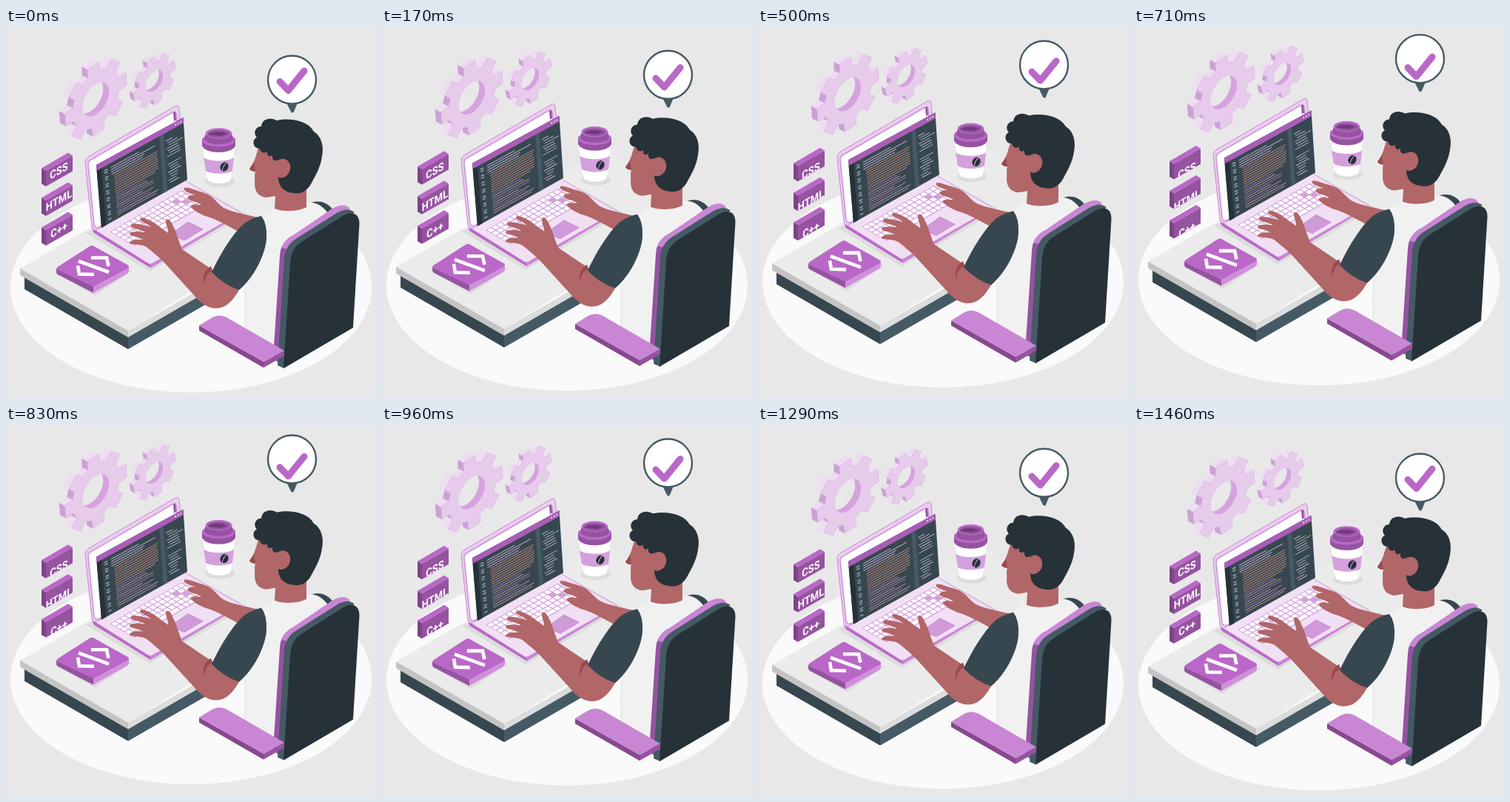
Animation of 500 by 500 pixels, one loop 1500 ms. Source, as an HTML page:

```html
<!DOCTYPE html>
<html lang="en">
<head>
<meta charset="utf-8">
<title>Developer at work</title>
<style>
html, body { margin: 0; width: 100%; height: 100%; overflow: hidden; background: #e8e8e8; }
svg { display: block; width: 100vw; height: 100vh; }
text { font: 700 15px Roboto, Arial, sans-serif; fill: #fff; text-anchor: middle; }
</style>
</head>
<body>
<svg id="stage" viewBox="0 0 500 500"></svg>
<script>
const C = {
  bg: '#e8e8e8', main: '#ba68c8', deep: '#9553a0', soft: '#c986d4', pale: '#e6cbeb',
  ink: '#263238', slate: '#37474f', steel: '#455a64', skin: '#b16668', shade: '#9a4a4e'
};

const path = (d, fill, extra = '') => `<path d="${d}" fill="${fill}" ${extra}/>`;
const poly = (pts, fill, extra = '') => `<polygon points="${pts}" fill="${fill}" ${extra}/>`;
const line = (d, color, w, extra = '') =>
  `<path d="${d}" fill="none" stroke="${color}" stroke-width="${w}" ${extra}/>`;
const oval = (x, y, rx, ry, fill, extra = '') =>
  `<ellipse cx="${x}" cy="${y}" rx="${rx}" ry="${ry}" fill="${fill}" ${extra}/>`;
const fix = p => p.map(n => n.toFixed(1)).join(' ');

let seed = 7;
const rand = () => (seed = seed * 16807 % 2147483647) / 2147483647;

// Upright gear on the left isometric wall, extruded back by (ex, ey).
function gear(id, cx, cy, r, hole, turn, ex, ey) {
  const at = (a, q) => {
    const u = Math.cos(a) * q, v = Math.sin(a) * q;
    return [cx + u * .866, cy - u * .5 + v];
  };
  const rad = d => d * Math.PI / 180;
  const rim = [];
  for (let i = 0; i < 8; i++) {
    const a = turn + i * 45;
    [[-15, .76], [-10.5, 1], [10.5, 1], [15, .76]].forEach(([d, k]) => rim.push(at(rad(a + d), r * k)));
  }
  let out = '';
  rim.forEach((p, i) => {
    const q = rim[(i + 1) % rim.length];
    const nx = q[1] - p[1], ny = p[0] - q[0];
    if (nx * ex + ny * ey <= 0) return;
    const tone = ny < -Math.abs(nx) * .35 ? '#eedcf1' : '#cda1d5';
    out += poly([p, q, [q[0] + ex, q[1] + ey], [p[0] + ex, p[1] + ey]].map(fix).join(' '), tone);
  });
  const ring = [];
  for (let i = 0; i < 48; i++) ring.push(fix(at(i * Math.PI / 24, hole)));
  const inner = 'M' + ring.join('L') + 'Z';
  return out + path('M' + rim.map(fix).join('L') + 'Z', C.pale, 'stroke="#d5a6de" stroke-width=".5"') +
    `<clipPath id="${id}"><path d="${inner}"/></clipPath><g clip-path="url(#${id})">` +
    path(inner, '#d5a2de') + path(inner, C.bg, `transform="translate(${ex} ${ey})"`) + '</g>';
}

function tag(label, y) {
  const face = `54,${y + 24.5} 90,${y + 4} 90,${y + 25} 54,${y + 45.5}`;
  return poly(`48,${y + 21} 54,${y + 24.5} 54,${y + 45.5} 48,${y + 42}`, '#7d4486') +
    poly(`48,${y + 21} 84,${y} 90,${y + 4} 54,${y + 24.5}`, C.main) + poly(face, C.deep) +
    `<clipPath id="tag${y}"><polygon points="${face}"/></clipPath><g clip-path="url(#tag${y})"><g class="lag">` +
    `<text transform="matrix(.866 -.5 0 1 71.5 ${y + 25})" y="4.500">${label}</text></g></g>`;
}

function desk() {
  return poly('25,337 165,417 165,434 25,353', C.slate) +
    poly('165,417 290,345 290,362 165,434', C.steel) +
    poly('19,325 300,163 420,250 165,409', '#ebebeb') +
    poly('19,325 165,409 165,418 19,334', '#c4c4c4') +
    poly('165,409 300,331 300,340 165,418', '#dcdcdc');
}

// Point on the screen, u across and v down.
function onScreen(u, v) {
  const mix = (a, b, c, d) => (a * (1 - u) + b * u) * (1 - v) + (c * (1 - u) + d * u) * v;
  return fix([mix(122, 239.5, 129, 245), mix(185, 121, 270, 205)]);
}
const area = (u0, v0, u1, v1, fill) =>
  poly([[u0, v0], [u1, v0], [u1, v1], [u0, v1]].map(p => onScreen(...p)).join(' '), fill);
const dash = (u0, u1, v, color, w = 1) =>
  line(`M${onScreen(u0, v)}L${onScreen(u1, v)}`, color, w);

function code() {
  let s = area(0, 0, 1, 1, C.slate) + area(0, .09, .055, 1, C.ink) +
    area(.72, .09, .77, 1, C.steel) + area(0, 0, 1, .09, '#a95db6');
  [.91, .94, .97].forEach(u => {
    const [x, y] = onScreen(u, .045).split(' ');
    s += oval(x, y, 1, 1.2, '#f0d9f3');
  });
  for (let i = 0; i < 22; i++) {
    const v = .16 + i * .037;
    const color = i < 4 ? '#cdb9da' : i < 12 ? '#c98d7f' : ['#c98d7f', '#9a76b4', '#b9a3c9'][i % 3];
    const start = .16 + (i > 3 ? .03 : 0);
    const end = i > 3 && i < 12 ? .66 + rand() * .04 : .48 + rand() * .2;
    s += dash(start, end, v, color);
    if (i % 3 !== 2) s += dash(.085, .12, v, '#a9b5ba', 1.3);
  }
  for (let i = 0; i < 17; i++) {
    if (i === 7 || i === 8) continue;
    const u = .79 + (i % 3) * .015;
    s += dash(u, u + .06 + rand() * .11, .22 + i * .042, i % 4 ? '#aeb6bd' : '#d9c1e4');
  }
  return s;
}

function keys() {
  const at = (a, b) => fix([142 + (a + b) * .866, 275.5 + (b - a) * .5]);
  const block = (a, b, w, h, fill) =>
    poly([at(a, b), at(a + w, b), at(a + w, b + h), at(a, b + h)].join(' '), fill);
  let s = block(-1, -1, 112, 38, '#d3a0dc');
  for (let r = 0; r < 5; r++) {
    for (let c = 0; c < 15; c++) {
      const accent = (r === 1 && c === 12) || (r === 2 && c === 13);
      s += block(c * 7.4, r * 7.4, r === 4 && c > 3 && c < 9 ? 7.4 : 6, 6, accent ? '#d4a0dc' : '#fff');
    }
  }
  return s;
}

function laptop() {
  return poly('108,277 194,329 326,252 240,205', '#dcdcdc') +
    path('M117 271L195 319V324L119 277Q117 275 117 271Z', C.main) +
    path('M195 319L315 249Q319 249 317 252L198 323Q196 325 195 324Z', C.soft) +
    path('M117 271L238 204L315 248Q318 249 315 251L198 318Q195 320 192 318Z', '#f1dff4', 'stroke="#c986d4" stroke-width=".8"') +
    keys() + poly('222,279 246,262 266,272 241,287', '#d09ad9', 'stroke="#ba68c8" stroke-width=".6"') +
    path('M107 181Q107 177 111 174L228 106Q233 103 234 108L243 200L122 273Q117 274 116 268Z', '#ebcdf0', 'stroke="#c986d4" stroke-width="1"') +
    path('M111 184Q111 180 115 178L225 114Q229 112 230 116L239 203L126 269Q120 271 119 266Z', '#fff', 'stroke="#d09ad9" stroke-width="1.800"') +
    poly('226,114 229,113 230,124 227,126', C.deep) + code();
}

function pad() {
  return path('M66 331L116 300L170 328L120 362Z', '#dcdcdc') +
    path('M68 325L118 349V358L70 333Q68 332 68 329Z', C.deep) +
    path('M118 349L166 322V328Q166 330 164 332L118 358Z', '#d08fdb') +
    path('M71 322L113 295Q116 293 119 295L164 320Q168 322 164 325L121 348Q118 350 115 348L70 327Q66 325 71 322Z', C.main) +
    line('M97 321L99 332.500L119 333M115 310.500L136 310.500L138.500 322M98 315L139 330', '#fff', 4.6);
}

function cup() {
  return oval(289, 207, 20, 8, '#dcdcdc') +
    path('M266 160L272 204C275 212 301 212 304 204L309 160Z', '#fff') +
    path('M267 175C276 181 299 181 308 175L306 193C298 198 278 198 270 193Z', '#d3a0dc') +
    `<g transform="rotate(30 295 187.5)">${oval(295, 187.5, 5.4, 6.4, C.ink)}${line('M295 181Q292.500 187 295.500 194', '#d3a0dc', 1)}</g>` +
    path('M265 151C265 142 310 142 310 151V159C306 171 269 171 265 159Z', C.deep) +
    oval(287.5, 151.5, 22.3, 9, C.main) +
    path('M270 142H305L307 151C302 159 273 159 268 151Z', C.deep) +
    oval(287.5, 142.5, 17.7, 7.3, C.main) + oval(287.5, 143, 15, 5.4, C.deep) +
    path('M273 144C278 139 292 139 299 143L290 146Z', '#70397a');
}

function man() {
  return path('M345 257C328 253 312 250 301 246C295 244 291 241 288 238L280 230C276 226 270 223 262 221C254 219 248 215 241 216C238 220 248 223 256 226C250 225 243 228 246 231C250 235 258 234 264 239C256 238 248 238 250 242C254 247 262 251 269 254C285 258 300 268 320 278Z', C.skin) +
    path('M412 236C425 232 436 236 443 248L432 256Z', C.slate) +
    path('M343 254L365 242L407 236C418 234 430 241 436 252L385 300L368 442L323 412V350L345 290Z', '#f1f1f1') +
    line('M323 350V408', '#dedede', 1) +
    path('M343 158C338 168 338 179 329 190C330 193 334 194 337 194C335 200 337 204 336 210C336 222 342 228 352 229L364 227L363 244C375 249 395 248 406 242V205L380 160Z', C.skin) +
    path('M329 190L335 182L337 194Q331 194 329 190Z', C.shade) +
    path('M343 163C333 163 332 150 339 148C333 141 338 133 345 133C346 122 358 120 366 125C384 121 408 125 416 140C426 146 430 159 427 174C425 188 418 200 412 211C406 221 398 225 388 223C376 222 368 214 368 202L367 178C362 182 359 176 360 172C354 176 352 170 353 167C348 171 344 167 343 163Z', C.ink) +
    oval(373, 189.5, 11, 13, C.skin, 'transform="rotate(18 373 189.500)"') +
    path('M278 326L238 299C233 287 230 275 226 268C223 259 217 255 216 261C216 267 220 272 219 277C213 273 207 268 200 263C193 259 183 254 181 258C180 262 190 263 196 269C188 267 172 262 169 266C167 271 180 271 188 276C180 275 168 274 167 278C167 282 178 281 186 286C178 285 168 286 167 290C168 294 182 291 190 296C196 301 205 308 213 316L254 361C265 374 276 381 290 378C302 375 310 363 316 352Z', C.skin) +
    path('M277 322C269 326 265 336 268 346C269 338 271 331 279 328Z', C.shade) +
    path('M322 264Q334 256 345 254Q353 264 352 284C351 306 334 339 315 354Q294 347 278 330C288 309 304 280 322 264Z', C.slate);
}

function chair() {
  return path('M361 446L370 308C371 294 376 288 386 281L440 260L380 310L372 456Z', C.deep) +
    path('M372 297C375 289 380 285 388 280L441 244C450 239 458 238 463 242L466 247L395 294L382 299Z', C.soft) +
    path('M367 456L376 312C377 299 383 290 393 284L447 250C457 244 465 244 471 249L400 300L376 460Z', C.steel) +
    path('M375 460L384 318C385 303 390 295 401 288L455 254C468 246 478 251 477.5 265L469 405Z', C.ink) +
    path('M261 402L348 451V459L261 409Z', '#87488f') +
    path('M348 451L376 436V443L348 459Z', C.deep) +
    path('M261 402L279 391Q288 386 298 391L376 436L348 451Z', C.soft);
}

function bubble() {
  return path('M379 101H394L389 113Q387 116 385 113Z', C.steel) +
    `<circle cx="386.5" cy="70" r="32.5" fill="#fff" stroke="${C.steel}" stroke-width="2.4"/>` +
    `<g class="lag">${line('M370 72.500L381.500 84.500L403 58', C.main, 9, 'stroke-linecap="round" stroke-linejoin="round"')}</g>`;
}

const stage = document.getElementById('stage');
stage.innerHTML = `<rect width="500" height="500" fill="${C.bg}"/><g id="scene">` +
  oval(250, 350, 244, 142.5, '#fafafa') +
  gear('holeA', 121.5, 96.5, 48.5, 20.5, -5, -8, -4) +
  gear('holeB', 200.5, 71.5, 33, 13.5, -11, -5.5, -3) +
  tag('CSS', 168.5) + tag('HTML', 208.5) + tag('C++', 248.5) +
  desk() + laptop() + pad() + cup() + man() + chair() +
  `<g id="bubble">${bubble()}</g></g>`;

const scene = document.getElementById('scene');
const balloon = document.getElementById('bubble');
const lags = stage.querySelectorAll('.lag');
const shift = (el, y) => el.setAttribute('transform', `translate(0 ${y.toFixed(2)})`);

// Linear rise and fall, stepped at 24 images per second.
function draw(ms) {
  const step = Math.floor((ms % 1500) * .024 + .1) % 36;
  const rise = 1 - Math.abs(1 - (step + .5) / 18);
  shift(scene, .3 - 10 * rise);
  shift(balloon, .5 - 20 * rise);
  lags.forEach(el => shift(el, 10 * rise - .3));
}

const begin = performance.now();
function tick() {
  draw(performance.now() - begin);
  requestAnimationFrame(tick);
}
draw(0);
requestAnimationFrame(tick);
</script>
</body>
</html>
```
